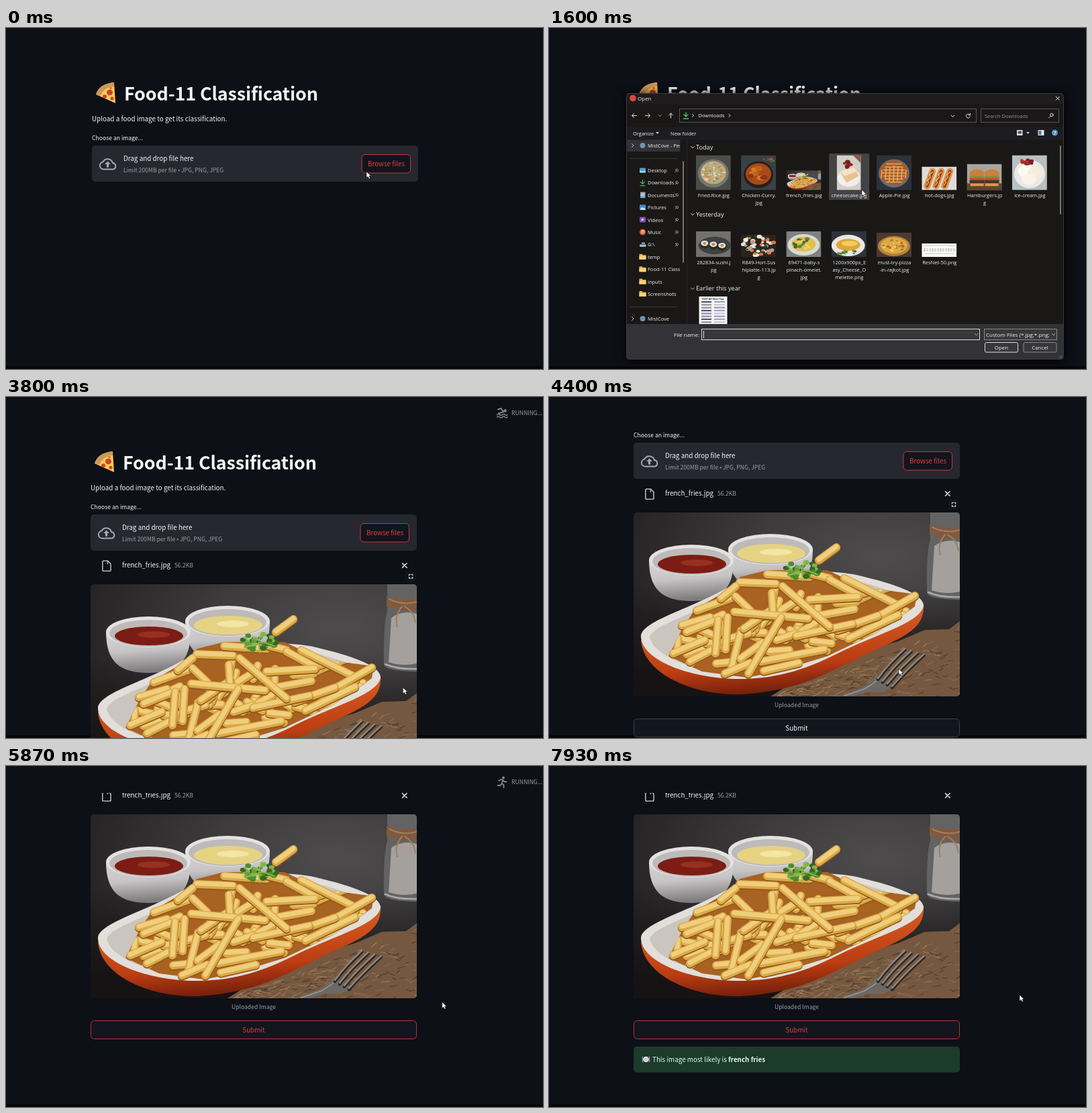
Recreate the animation shown at these times as an HTML page. Size 800x508 px, loop 8 s.

```html
<!DOCTYPE html>
<html lang="en">
<head>
<meta charset="utf-8">
<title>Food-11 Classification</title>
<style>
html, body { margin: 0; width: 100%; height: 100%; overflow: hidden; background: #0d1016; }
svg { display: block; width: 100%; height: 100%; }
.web { font: 9.85px "Noto Sans CJK JP", "Noto Sans CJK SC", "Noto Sans CJK", "Open Sans", sans-serif; fill: #f6f6f8; }
.web .small { font-size: 8.62px; }
.web .dim { fill: #9c9da5; }
.win { font: 7.5px "Open Sans", "Noto Sans", sans-serif; fill: #f0f0f0; }
.win .field { font-size: 8px; }
.win .group { font-size: 9.2px; }
.line { fill: none; stroke: #e4e4e4; stroke-width: 1; stroke-linecap: round; stroke-linejoin: round; }
</style>
</head>
<body>
<svg id="stage" viewBox="0 0 800 508" xmlns="http://www.w3.org/2000/svg"></svg>
<script>
const LOOP = 8000;

// ---------- drawing helpers ----------
const rect = (x, y, w, h, fill, more = '') => `<rect x="${x}" y="${y}" width="${w}" height="${h}" fill="${fill}" ${more}/>`;
const oval = (x, y, rx, ry, fill, more = '') => `<ellipse cx="${x}" cy="${y}" rx="${rx}" ry="${ry}" fill="${fill}" ${more}/>`;
const path = (d, fill, more = '') => `<path d="${d}" fill="${fill}" ${more}/>`;
const line = (d, color = '#e4e4e4', width = 1) => `<path class="line" d="${d}" style="stroke:${color};stroke-width:${width}"/>`;
const text = (x, y, s, more = '') => `<text x="${x}" y="${y}" ${more}>${s}</text>`;
const times = (n, draw) => Array.from({ length: n }, (_, i) => draw(i)).join('');

function random(seed) {
  return () => {
    seed = (seed * 16807) % 2147483647;
    return seed / 2147483647;
  };
}

// Small blobs scattered inside an ellipse.
function scatter(n, seed, x, y, rx, ry, size, colors) {
  const rnd = random(seed * 7919 + 17);
  return times(n, i => {
    const a = rnd() * 6.283, d = Math.sqrt(rnd()), s = size * (0.6 + 0.7 * rnd());
    return oval((x + Math.cos(a) * rx * d).toFixed(1), (y + Math.sin(a) * ry * d).toFixed(1),
      s.toFixed(1), (s * 0.75).toFixed(1), colors[i % colors.length]);
  });
}

// ---------- photo of the fries ----------
const FRIES = [
  [402, 243, 428, 224], [284, 276, 338, 278], [325, 264, 388, 268], [390, 263, 418, 270],
  [440, 270, 516, 308], [418, 272, 462, 296], [388, 302, 460, 298], [492, 326, 545, 296],
  [446, 360, 520, 325], [430, 347, 490, 326], [368, 356, 452, 338], [400, 326, 455, 316],
  [220, 318, 275, 298], [256, 300, 278, 282], [198, 340, 240, 328], [205, 350, 245, 334],
  [185, 382, 232, 362], [210, 394, 252, 372], [248, 382, 252, 332], [263, 376, 266, 328],
  [272, 404, 285, 352], [290, 345, 312, 330], [334, 325, 332, 292], [285, 390, 318, 366],
  [316, 394, 410, 376], [262, 412, 300, 396], [320, 408, 372, 396], [278, 297, 300, 318],
  [348, 282, 418, 342], [276, 320, 386, 330], [297, 412, 346, 328]
];
const MOUND = 'M178 386L200 342L218 316L262 290L285 268L325 258L415 258L470 284L548 294L545 312L490 350L415 386L340 409L295 418L228 409Z';

function fry([x1, y1, x2, y2]) {
  const stroke = (dy, color, w) =>
    `<path d="M${x1} ${y1 + dy}L${x2} ${y2 + dy}" stroke="${color}" stroke-width="${w}" stroke-linecap="round"/>`;
  return stroke(1.5, '#8f5a1c', 12.5) + stroke(0, '#dca948', 12) + stroke(-1.2, '#efcf7c', 7);
}

function looseFries() {
  const rnd = random(4242);
  return times(60, () => {
    const x = 190 + rnd() * 330, y = 372 - (x - 190) * 0.2 + (rnd() - 0.5) * 75;
    const a = rnd() * 2.4 - 1.6;
    return fry([x, y, x + Math.cos(a) * 30, y + Math.sin(a) * 20].map(Math.round));
  });
}

function burlap() {
  const rnd = random(91);
  return path('M612 334L596 346L560 347L520 364L470 378L440 392L390 408L330 446H612Z', '#75583f') +
    times(240, i => {
      const x = 340 + rnd() * 270, top = 446 - (x - 330) * 0.36, y = top + rnd() * (446 - top);
      return line(`M${x.toFixed(0)} ${y.toFixed(0)}l${(4 + rnd() * 9).toFixed(0)} ${(rnd() * 10 - 6).toFixed(0)}`,
        ['#9c7d5a', '#523b2a', '#876a4e'][i % 3], 1.2);
    });
}

function bowl(x, y, sauce, shine) {
  return path(`M${x - 63} ${y}C${x - 63} ${y + 45} ${x - 42} ${y + 61} ${x} ${y + 61}S${x + 63} ${y + 45} ${x + 63} ${y}Z`, 'url(#china)') +
    oval(x, y, 63, 23, '#e4e2e1') + oval(x, y + 2, 58, 20, '#bdbab9') +
    oval(x + 1, y + 6, 51, 14, sauce) + oval(x + 8, y + 4, 24, 5, shine);
}

function fork() {
  const tine = (i, color, width, dy) =>
    line(`M${490 + i * 7} ${419 + i * 4 + dy}Q${506 + i * 8} ${397 + i * 4 + dy} ${530 + i * 9.5} ${375 + i * 2.7 + dy}`, color, width);
  return path('M432 446L466 433Q480 424 488 414L516 430Q500 442 478 439L452 446Z', '#6d6864') +
    line('M440 445L470 435Q482 428 492 420', '#9b9794', 1.5) +
    times(4, i => tine(i, '#2e2520', 4.5, 2)) + times(4, i => tine(i, '#8d8986', 2.4, 0));
}

const photo = `<g id="photo" clip-path="url(#frame)" fill="none">
  ${rect(126, 172, 486, 274, 'url(#wall)')}
  ${rect(126, 172, 486, 274, 'url(#shade)')}
  ${path('M568 172V212Q562 230 563 292Q566 301 612 302V172Z', '#646363')}
  ${path('M574 222Q590 210 612 216V290Q590 295 570 288Z', '#a3a09e')}
  ${path('M567 190Q590 196 612 193V210Q590 214 567 205Z', '#7d5a41')}
  ${line('M571 194q20 10 41 4M590 205q-12 14-7 30M594 205q14 8 16 24', '#a37c58', 2)}
  ${line('M565 291q18 8 47 7', '#a9abab', 2.5)}
  ${burlap()}
  ${bowl(330, 227, '#e6d283', '#f3e5a4')}
  ${bowl(212, 243, '#7c1c14', '#96301f')}
  ${path('M137 362C140 408 205 444 285 443C390 436 420 405 505 368C545 350 560 335 558 308Z', 'url(#glaze)')}
  ${path('M137 358C135 335 205 318 262 286C330 256 425 255 470 268C520 280 560 295 558 312C550 338 490 352 430 382C375 410 330 421 275 420C205 417 140 392 137 358Z', '#e2deda')}
  ${path('M150 357C158 338 215 325 270 293C340 265 420 264 466 276C510 288 545 300 544 312C530 332 470 346 420 372C370 398 325 413 278 412C215 409 155 386 150 357Z', '#cbc5bf')}
  ${path(MOUND, '#a86222')}
  <g clip-path="url(#mound)">${looseFries()}</g>
  ${FRIES.map(fry).join('')}
  ${scatter(46, 5, 377, 257, 26, 13, 4, ['#4f8a2c', '#7fb548', '#35691f', '#67a03a'])}
  ${line('M378 274Q374 260 380 245M355 266L382 258L400 264', '#8cc255', 1.4)}
  ${fork()}
</g>`;

// ---------- web page ----------
const page = `<g class="web" clip-path="url(#below)"><g id="page">
  <g transform="translate(-2 -107)">
    ${path('M134 99Q139 83 161 81L163 112Z', '#f8c954')}
    ${path('M134 99Q139 83 161 81V87Q146 88 141 101Z', '#cf965a')}
    ${oval(154.5, 96, 4.5, 4.2, '#c9432c')}${oval(147, 102, 3, 2.7, '#c9432c')}${oval(158, 105, 2.5, 2.5, '#c9432c')}
    ${oval(156, 89.5, 1.8, 1.2, '#d65a35')}
    ${text(176, 108, 'Food-11 Classification', 'font-size="26.9" font-weight="700" letter-spacing="-.13"')}
    ${text(128, 139, 'Upload a food image to get its classification.')}
  </g>
  ${text(126, 60, 'Choose an image...', 'class="small"')}
  ${rect(126, 68, 486, 54, '#262730', 'rx="5"')}
  <path d="M143 103.500a5.500 5.500 0 0 1-.6-10.900a7.800 7.800 0 0 1 14.600 1.400a4.800 4.800 0 0 1 .2 9.500Z" fill="none" stroke="#a6a7b4" stroke-width="2"/>
  ${path('M149.500 91.500l4.500 4.600h-2.900v4.400h-3.200v-4.400h-2.900Z', '#a6a7b4')}
  ${text(173, 91, 'Drag and drop file here')}
  ${text(173, 108, 'Limit 200MB per file • JPG, PNG, JPEG', 'class="small dim"')}
  ${rect(528, 81.5, 72.500, 27.500, '#12151d', 'rx="5" stroke="#c8383d"')}
  ${text(564.500, 98.500, 'Browse files', 'text-anchor="middle" style="fill:#e53b3f"')}
  <g id="upload">
    ${line('M151.500 137H145.500Q143.800 137 143.800 139V150.500Q143.800 152.300 145.500 152.300H154.300Q156 152.300 156 150.500V141.500ZV141.500H151.500Z', '#b4b5bd', 1.6)}
    ${text(173, 147, 'french_fries.jpg')}
    ${text(251, 147, '56.2KB', 'class="small dim"')}
    ${line('M590.500 140.700l6.600 6.600m0-6.600l-6.600 6.600', '#f4f4f6', 1.4)}
    <g id="enlarge">
      ${rect(595, 152, 16, 16, '#12151c', 'rx="4"')}
      ${line('M600.500 159v-1.700h1.700m1.800 0h1.700v1.700m0 2.200v1.700h-1.700m-1.800 0h-1.700v-1.700', '#e8e8ec', 1.1)}
    </g>
    ${photo}
    ${text(369, 462, 'Uploaded Image', 'class="small dim" text-anchor="middle"')}
    <rect id="submit" x="126.500" y="479.500" width="485" height="27" rx="5" fill="#12161e"/>
    ${text(369, 496.500, 'Submit', 'id="submitText" text-anchor="middle"')}
  </g>
  <g id="answer">
    ${rect(126, 518, 486, 38.500, '#1c3b2a', 'rx="5"')}
    ${oval(144.500, 537, 4.300, 4.300, '#e6e6ee')}${oval(144.500, 537, 2.800, 2.800, '#c6c7d4')}
    ${line('M139.500 533v8M149.500 533v8', '#9fa1ae', 1.2)}
    <text x="154" y="540.500" style="fill:#e0fbe6">This image most likely is <tspan font-weight="700">french fries</tspan></text>
  </g>
</g></g>
<g id="running" class="web">
  <g id="swimmer">
    ${oval(743.500, 20.500, 2.2, 2.2, '#85878e')}
    ${line('M733 18.500l4.500-1.500l3.500 5l-7 2.500', '#85878e', 2)}
    ${line('M731.500 26.500q2-2 4 0t4 0t4 0t3.500-.3M731.500 30q2-2 4 0t4 0t4 0t3.500-.3', '#85878e', 1.5)}
  </g>
  <g id="runner">
    ${oval(741, 17.500, 2, 2, '#85878e')}
    ${line('M734 22l3.500-2l3 1l-2 5l3 2v4M738.500 26l-2 3h-4M740.500 21l2 2.500h3', '#85878e', 1.8)}
  </g>
  ${text(753, 27, 'RUNNING...', 'class="small dim"')}
</g>`;

// ---------- file dialog ----------
const COLUMN = 67.3, TILE_X = 215.3;
const center = i => 244.800 + COLUMN * (i % 8);

// [lines of the label, width, height, background, what lies on it]
const FILES = [
  [['Fried-Rice.jpg'], 52, 52, '#4b4d4a', oval(26, 27, 23, 21, '#77766d') + oval(26, 26, 19, 17, '#b9a983') + scatter(60, 3, 26, 25, 17, 15, 1.800, ['#e3d6b5', '#cdb582', '#7f9a4e', '#d5874c'])],
  [['Chicken-Curry.', 'jpg'], 52, 52, '#3b4043', oval(26, 29, 22, 20, '#24201e') + oval(26, 28, 19, 16, '#a94a16') + scatter(14, 8, 25, 28, 13, 9, 4, ['#d27b2a', '#8c3612', '#c0601f']) + scatter(10, 2, 40, 7, 10, 5, 2, ['#647d36', '#a33b24'])],
  [['french_fries.jpg'], 52, 29.300, '#333', '<use href="#photo" transform="scale(.107) translate(-126 -172)"/>'],
  [['cheesecake.jpg'], 36, 52, '#d3cec8', oval(18, 34, 17, 13, '#f1efec') + path('M5 26L25 18L33 31L15 41Z', '#e7c38f') + path('M5 26L25 18L30 24L12 31Z', '#f5e3c2') + scatter(8, 4, 15, 14, 6, 5, 3, ['#9c2b20', '#762018']) + path('M24 0H36V12Z', '#8b5a48')],
  [['Apple-Pie.jpg'], 52, 52, '#2d3138', oval(26, 27, 23, 21, '#6a6d70') + oval(26, 26, 21, 18, '#a85b25') + times(7, i => line(`M${8 + i * 6} ${16 + Math.abs(3 - i) * 2}L${7 + i * 6} ${40 - Math.abs(3 - i) * 2}M${9 + Math.abs(3 - i) * 2} ${13 + i * 4.500}L${43 - Math.abs(3 - i) * 2} ${13 + i * 4.500}`, '#e2a965', 1.700))],
  [['hot-dogs.jpg'], 52, 35, '#dedbd8', [12, 25, 38].map(x => line(`M${x + 4} 7L${x - 4} 29`, '#d69a52', 10) + line(`M${x + 4} 7L${x - 4} 29`, '#a63d20', 4.500) + line(`M${x + 4} 8l-4 4l1 4l-4 4l1 4l-3 4`, '#f0c848', 1.200)).join('')],
  [['Hamburgers.jp', 'g'], 52, 39, '#a9a49c', rect(0, 29, 52, 10, '#60442f') + [15, 37].map(x => oval(x, 15, 11, 7, '#c9813b') + rect(x - 11, 18, 22, 3, '#6d9a3c') + rect(x - 11, 21, 22, 3, '#cf4630') + rect(x - 11, 24, 22, 5, '#51301f') + rect(x - 10, 29, 20, 4, '#d39a56')).join('')],
  [['ice-cream.jpg'], 52, 52, '#b7c0c1', oval(26, 28, 23, 21, '#e9e9e7') + oval(20, 24, 11, 10, '#fffaf0') + oval(34, 27, 11, 10, '#f5ecdc') + oval(25, 36, 11, 8, '#faf3e6') + scatter(9, 6, 19, 9, 12, 5, 3.500, ['#b02e2b', '#7d1d22'])],
  [['282834-sushi.j', 'pg'], 52, 38, '#74706c', oval(28, 21, 24, 13, '#3c4146') + [13, 26, 39].map(x => oval(x, 18 + x / 8, 7, 6, '#223027') + oval(x, 16 + x / 8, 5.500, 4, '#e8e1d4') + oval(x, 16 + x / 8, 2.500, 2, '#db7a4b')).join('')],
  [['R849-Horl-Sus', 'hiplatte-113.jp', 'g'], 52, 33, '#2a2320', scatter(55, 9, 26, 16, 25, 15, 3, ['#ebe2d1', '#d97a45', '#293a25', '#f2eade', '#b8a184'])],
  [['69471-baby-s', 'pinach-omelet.', 'jpg'], 52, 38, '#7d8284', oval(26, 20, 24, 16, '#dad9d2') + oval(26, 19, 18, 11, '#dfc04e') + scatter(24, 11, 25, 18, 15, 9, 2.600, ['#64863a', '#eccf67', '#446b2b'])],
  [['1200x900px_E', 'asy_Cheese_O', 'melette.png'], 52, 38, '#30333a', oval(25, 21, 25, 16, '#e8e7e2') + oval(25, 20, 18, 9, '#dfa635') + oval(27, 18, 12, 4, '#f1cc66') + scatter(12, 12, 22, 31, 15, 3, 2, ['#4f7a35', '#77984b'])],
  [['must-try-pizza', '-in-rajkot.jpg'], 52, 36, '#4c3a31', oval(26, 20, 24, 15, '#b5803f') + oval(26, 19, 20, 12, '#dfa942') + scatter(26, 13, 26, 19, 17, 9, 1.800, ['#c05c30', '#f1cd6b', '#8a8c3c'])],
  [['ResNet-50.png'], 52, 20, '#fafafa', times(12, i => rect(3 + i * 4, 7, 2.400, 5, ['#b9c8df', '#e6d3a6', '#c5ddbc'][i % 3])) + line('M3 4Q26 1 49 4M4 15H48', '#9da3ab', 0.600)]
];

function tile([label, w, h, bg, art], i) {
  const bottom = i < 8 ? 241.500 : 341, x = center(i);
  return `<svg x="${x - w / 2}" y="${bottom - h}" width="${w}" height="${h}">${rect(0, 0, w, h, bg)}${art}</svg>` +
    label.map((s, k) => text(x + 0.500, bottom + 10.700 + k * 11, s, 'text-anchor="middle"')).join('');
}

const folder = y => path(`M134.500 ${y - 4}h4l1.200 1.500h4.800v6.500h-10Z`, '#e9b94c') + rect(134.500, y - 1, 10, 5, '#f6d374');
const SIDEBAR = [
  ['Desktop', y => rect(135, y - 3.500, 9, 7, '#4f9fc9', 'rx="1"') + rect(135, y + 1, 9, 2.500, '#a7d0e3')],
  ['Downloads', y => line(`M139.500 ${y - 4}v6m-3-3l3 3l3-3M136 ${y + 4.500}h7`, '#46b866', 1.300)],
  ['Documents', y => rect(136, y - 4.500, 7.500, 9, '#8ca6bb', 'rx="1"') + line(`M138 ${y - 1.500}h3.500m-3.500 2h3.500`, '#fff', 0.800)],
  ['Pictures', y => rect(135, y - 4, 9, 8, '#3c8ccb', 'rx="1"') + path(`M135.500 ${y + 3.500}l3-4l2 2l1.500-1.500l2 3.500Z`, '#d6ecf7')],
  ['Videos', y => rect(135, y - 4, 9, 8, '#8152b4', 'rx="1"') + path(`M138 ${y - 2}l4 2l-4 2Z`, '#f1e6fb')],
  ['Music', y => oval(139.500, y, 4.500, 4.500, '#d9603f') + line(`M138.500 ${y + 2}v-4l2.500-.5v3.500`, '#fff', 0.900)],
  ['G:\\', y => rect(135, y, 9.500, 3.500, '#aeb6bd', 'rx=".8"') + rect(138, y - 3, 5, 2.500, '#61a6d6')],
  ['temp', folder], ['Food-11 Classification', folder], ['inputs', folder], ['Screenshots', folder]
];

function sidebarRow([name, icon], i) {
  const y = 212 + i * 18.400;
  const pin = i < 7 ? line(`M188 ${y + 2.500}l2-2m-1.700-1.700l3.400 3.400m-2.400-3.200l1.500-1.300l2 2l-1.300 1.500`, '#b5b5b5', 0.900) : '';
  return icon(y) + text(147, y + 3, name) + pin;
}

const cloudRow = (y, name) => line(`M123.500 ${y - 2.500}l2.500 2.500l-2.500 2.500`, '#cfcfcf') +
  oval(139.500, y, 4, 4, '#6f93ad') + text(147, y + 3, name);
const groupTitle = (y, name) => line(`M211.500 ${y - 4}l2.500 2.500l2.500-2.500`, '#c8c8c8', 0.900) +
  text(219, y, name, 'class="group"');

const dialog = `<g id="dialog" class="win">
  ${rect(115, 97, 652, 397, '#191817', 'rx="5" style="filter:drop-shadow(0 1px 8px #000)"')}
  ${path('M115 113V102Q115 97 120 97H762Q767 97 767 102V113Z', '#1f1c1e')}
  ${rect(115, 147, 652, 20, '#1d1c20')}
  ${path('M115 441H767V489Q767 494 762 494H120Q115 494 115 489Z', '#333236')}
  ${rect(115.500, 97.500, 651, 396, 'none', 'rx="5" stroke="#3b3a3d"')}
  ${oval(125, 104.500, 4.800, 4.800, '#d84a3c')}
  ${text(132, 108, 'Open', 'class="field"')}
  ${line('M755.300 102.300l5 5m0-5l-5 5')}
  ${line('M130.500 130.500h-7m3-3l-3 3l3 3M143.500 130.500h7m-3-3l3 3l-3 3M181.500 134v-7m-3 3l3-3l3 3')}
  ${line('M163 129.500l2.200 2.200l2.200-2.200', '#a8a8a8')}
  ${rect(194.500, 120.500, 442, 20, '#191817', 'stroke="#565557"')}${rect(643.500, 120.500, 116, 20, '#191817', 'stroke="#565557"')}
  ${line('M204 126v6m-3-3l3 3l3-3M200.500 135h7', '#4fc36d', 1.300)}
  ${line('M213.500 128.500l2 2l-2 2M268 128.500l2 2l-2 2M599 130l2.500 2.500l2.500-2.500M627 129.500a3 3 0 1 0 .3 2.500M627.500 127.500v2.200h-2.200')}
  ${text(222.500, 133.300, 'Downloads')}${text(649, 133.500, 'Search Downloads', 'style="fill:#969696"')}
  <circle cx="749" cy="129.500" r="2.200" class="line"/>${line('M747.300 131.200l-2.500 2.500')}
  ${text(125, 159.500, 'Organize')}${text(181, 159.500, 'New folder')}
  ${path('M159 155h5l-2.500 2.800ZM711 155h5l-2.500 2.800Z', '#d8d8d8')}
  ${rect(697, 152, 8.500, 8, '#e8e8e8')}${rect(698.500, 153.500, 5.500, 4, '#4a5668')}
  ${rect(728.500, 152, 9, 8, '#e6edf2')}${rect(729.500, 153, 4, 6, '#427fa5')}
  ${oval(753.500, 156, 4.500, 4.500, '#5796c4')}${text(753.500, 158.700, '?', 'text-anchor="middle" font-weight="700"')}
  ${rect(116.500, 166.500, 79, 17.500, '#333236')}
  <g clip-path="url(#side)">
    ${cloudRow(175, 'MistCove - Personal')}${SIDEBAR.map(sidebarRow).join('')}${cloudRow(433, 'MistCove')}
  </g>
  ${line('M121 194.500H190M121 415.500H190', '#3f3e41', 0.800)}
  ${line('M205.500 167V441', '#2a292b', 0.800)}
  ${line('M200 199V349M762 176V277', '#8d8d8f', 1.600)}
  <g clip-path="url(#list)">
    <rect id="hover" y="187" width="60" height="69" fill="#434346"/>
    <rect id="selected" x="350.400" y="187.500" width="59.500" height="68.500" fill="#555457" stroke="#929294"/>
    ${groupTitle(180.500, 'Today')}${groupTitle(280.500, 'Yesterday')}${groupTitle(391, 'Earlier this year')}
    ${FILES.map(tile).join('')}
    ${rect(223.500, 400, 42, 45, '#f5f5f4')}
    ${text(244.500, 404.500, 'REST API Best Tips', 'text-anchor="middle" style="font-size:3.600px;font-weight:700;fill:#333"')}
    ${times(8, i => rect(227, 407 + i * 4.300, 15, 2.200, i % 3 ? '#8f91a0' : '#52566f') + rect(246, 407 + i * 4.300, 16, 2, ['#85a5cf', '#c5c6cf', '#a389ba'][i % 3]))}
  </g>
  ${text(186, 459.500, 'File name:', 'class="field"')}
  ${rect(227.500, 448.500, 414, 16, '#38373a', 'id="nameField"')}
  ${rect(648.500, 448.500, 108, 16, '#38373a', 'stroke="#88878a"')}
  ${line('M634.500 455.500l2.200 2.200l2.200-2.200M749.500 455.500l2.200 2.200l2.200-2.200', '#c0c0c0', 0.900)}
  ${text(651, 459.500, 'Custom Files (*.jpg;*.png;', 'class="field"')}
  ${text(230, 459.500, 'french_fries.jpg', 'class="field" id="fileName"')}
  <path id="caret" d="M230.500 451v11" stroke="#f4f4f4" stroke-width=".9"/>
  ${rect(649.500, 468.500, 49, 14.500, '#38373a', 'rx="2" stroke="#dedede"')}
  ${rect(707, 468.500, 49, 14.500, '#38373a', 'rx="2" stroke="#88878a"')}
  ${text(674, 479, 'Open', 'class="field" text-anchor="middle"')}${text(731.500, 479, 'Cancel', 'class="field" text-anchor="middle"')}
  ${line('M760 491.500l4-4M762.500 491.500l1.500-1.500', '#8a8a8c', 0.900)}
</g>`;

const pointer = `<g id="pointer">
  <path id="arrow" d="M0 0V9.200L2.200 7.200L3.800 10.500L5.500 9.700L4 6.500H6.800Z" fill="#fff" stroke="#111" stroke-width=".6"/>
  <path id="hand" d="M-1 0.800Q0-.5 1 .8V4.500L5.500 5.500Q6.800 6 6.300 8.500L5.300 12H-.8L-3.800 7.800Q-4 6.300-2.500 6.700L-1 8Z" fill="#fff" stroke="#111" stroke-width=".6"/>
</g>`;

document.getElementById('stage').innerHTML = `<defs>
  <clipPath id="frame">${rect(126, 172, 486, 274, '#000', 'rx="5"')}</clipPath>
  <clipPath id="mound">${path(MOUND, '#000')}</clipPath>
  <clipPath id="below">${rect(0, 40, 800, 468, '#000')}</clipPath>
  <clipPath id="side">${rect(115, 166, 80, 275, '#000')}</clipPath>
  <clipPath id="list">${rect(206, 167, 560, 274, '#000')}</clipPath>
  <radialGradient id="wall" cx=".76" cy=".24" r=".8"><stop stop-color="#4e4c4d"/><stop offset=".5" stop-color="#3c3a3b"/><stop offset="1" stop-color="#262324"/></radialGradient>
  <linearGradient id="shade" x2="0" y2="1"><stop offset=".4" stop-color="#141011" stop-opacity="0"/><stop offset=".9" stop-color="#141011" stop-opacity=".85"/></linearGradient>
  <linearGradient id="china" x2=".15" y2="1"><stop stop-color="#d6d4d4"/><stop offset=".5" stop-color="#c6c4c5"/><stop offset="1" stop-color="#7f7c7e"/></linearGradient>
  <linearGradient id="glaze" x2=".25" y2="1"><stop offset=".3" stop-color="#d65a20"/><stop offset=".75" stop-color="#bb3d12"/><stop offset="1" stop-color="#7a220c"/></linearGradient>
</defs>
${rect(0, 0, 800, 508, '#0d1016')}${rect(0, 504, 800, 4, '#0a0509')}
${page}${dialog}${pointer}`;

// ---------- motion ----------
const POINTER = [
  [0, 537, 214], [800, 537, 214], [1500, 466, 241], [1680, 466, 241], [2020, 388, 228], [2250, 388, 228],
  [2850, 678, 467], [3400, 678, 467], [4150, 521, 405], [4700, 521, 405], [5050, 461, 391],
  [5450, 461, 391], [6050, 701, 341], [7999, 701, 341]
];
const SCROLL = [[0, 107], [3950, 107], [4300, 0], [4450, 0], [4800, -100]];
const OPENED = 470, PICKED = 2200, CLOSED = 3250, UPLOADED = 3730, SUBMITTED = 5330, ANSWERED = 7400;

function at(keys, t) {
  const next = keys.findIndex(k => k[0] > t);
  if (next < 0) return keys[keys.length - 1].slice(1);
  const a = keys[next - 1], b = keys[next];
  const p = (t - a[0]) / (b[0] - a[0]), e = p * p * (3 - 2 * p);
  return a.slice(1).map((v, i) => v + (b[i + 1] - v) * e);
}

const ui = {};
document.querySelectorAll('#stage [id]').forEach(e => ui[e.id] = e);
const show = (e, on) => { e.style.display = on ? '' : 'none'; };

function update(t) {
  const [x, y] = at(POINTER, t), [scroll] = at(SCROLL, t);
  const uploaded = t >= UPLOADED, picked = t >= PICKED;
  ui.page.setAttribute('transform', `translate(${uploaded ? 0 : 2} ${scroll})`);
  show(ui.upload, uploaded);
  show(ui.enlarge, x < 612);
  show(ui.answer, t >= ANSWERED);

  const overSubmit = uploaded && x > 126 && x < 612 && y > 479 + scroll && y < 508 + scroll;
  const red = overSubmit || t >= SUBMITTED;
  ui.submit.setAttribute('stroke', red ? '#b8343c' : '#3d4049');
  ui.submitText.style.fill = red ? '#e0393e' : '';

  const running = (t >= 3560 && t < 4200) || (t >= 5480 && t < ANSWERED);
  show(ui.running, running);
  const swims = Math.floor(t / 300) % 2 === 0;
  show(ui.swimmer, swims);
  show(ui.runner, !swims);

  show(ui.dialog, t >= OPENED && t < CLOSED);
  ui.dialog.style.opacity = Math.min(1, (t - OPENED + 60) / 130);
  const column = Math.floor((x - TILE_X) / COLUMN);
  const over = y > 187 && y < 256 && x - TILE_X - column * COLUMN < 60;
  show(ui.hover, over && !(picked && column === 2));
  ui.hover.setAttribute('x', TILE_X + column * COLUMN);
  show(ui.selected, picked);
  show(ui.fileName, picked);
  show(ui.caret, !picked && Math.floor(t / 530) % 2 === 1);
  ui.nameField.setAttribute('stroke', picked ? '#88878a' : '#d8d8d8');

  ui.pointer.setAttribute('transform', `translate(${x.toFixed(1)} ${y.toFixed(1)})`);
  show(ui.hand, overSubmit);
  show(ui.arrow, !overSubmit);
}

const start = performance.now();
function tick() {
  update((performance.now() - start) % LOOP);
  requestAnimationFrame(tick);
}
tick();
</script>
</body>
</html>
```
